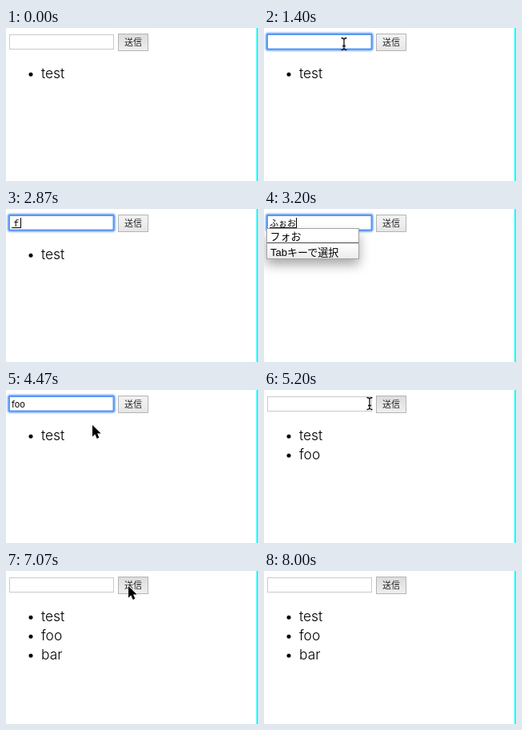
These frames come from a looping animation (315x192 px, 8870 ms). An HTML page:

```html
<!DOCTYPE html>
<html lang="ja">
<head>
<meta charset="utf-8">
<title>Form demo</title>
<style>
  html, body { margin: 0; width: 315px; height: 192px; overflow: hidden; background: #fff; }
  svg { display: block; }
  text { white-space: pre; }
  .item { font: 300 17.4px Inter, "Noto Sans CJK JP", sans-serif; }
  .field { font: 11px Inter, "Noto Sans CJK JP", sans-serif; }
  .menu { font: 500 13px "Liberation Sans", "Noto Sans CJK JP", sans-serif; }
</style>
</head>
<body>
<svg width="315" height="192" viewBox="0 0 315 192">
  <defs>
    <linearGradient id="light" x2="0" y2="1">
      <stop offset=".38" stop-color="#f0f0f0"/><stop offset="1" stop-color="#e5e5e5"/>
    </linearGradient>
    <linearGradient id="dark" x2="0" y2="1">
      <stop offset="0" stop-color="#dcdcdc"/><stop offset="1" stop-color="#efefef"/>
    </linearGradient>
    <linearGradient id="foot" x2="0" y2="1">
      <stop offset="0" stop-color="#fff"/><stop offset="1" stop-color="#ececec"/>
    </linearGradient>
    <filter id="soft" x="-30%" y="-80%" width="160%" height="260%"><feGaussianBlur stdDeviation="7"/></filter>
    <filter id="glow" x="-10%" y="-50%" width="120%" height="200%"><feGaussianBlur stdDeviation="1"/></filter>
  </defs>
  <g id="scene"></g>
</svg>
<script>
const LOOP = 8870, FPS = 15;
const scene = document.getElementById('scene');

// Pointer strokes: [tick, x, y]; the pointer is hidden between strokes.
const strokes = [
  { end: 28, keys: [[3, 243, 103], [5, 196, 58], [7, 148, 24], [10, 100, 16], [12, 100, 16], [13, 100, 20]] },
  { end: 90, keys: [[67, 108, 44], [70, 190, 40], [73, 160, 19], [76, 156, 18], [80, 108, 16], [82, 94, 20]] },
  { end: 111, keys: [[99, 94, 20], [103, 153, 19], [108, 153, 19], [109, 195, 65], [110, 243, 120]] }
];

// Field contents: [tick, text, caret x, composing]
const typing = [
  [0, '', 7], [28, 'ｓ', 18, 1], [37, '', 7], [43, 'ｆ', 18, 1], [45, 'ふぉ', 29, 1],
  [48, 'ふぉお', 40, 1], [53, 'foo', 24, 1], [60, 'foo', 24], [75, '', 7],
  [96, 'b', 14], [97, 'ba', 20], [98, 'bar', 24], [106, '', 7]
];

// Candidate menus: [tick, opacity, ...items]
const first = ['って', 'って分かる', 'する'];
const menus = [
  [0, 0], [30, .5, ...first], [31, 1, ...first], [37, .4, ...first], [38, 0],
  [44, 1, 'ふ', 'ふたつ', 'ふる'], [46, 1, 'フォ', 'ふぉ'],
  [48, 1, 'フォお'], [53, .5, 'フォお'], [54, .15, 'フォお'], [56, 0]
];

const focusSpans = [[13, 74], [85, 103]];
const caretSpans = [[14, 21], [28, 64], [86, 92], [96, 103]];
const within = (spans, n) => spans.some(([a, b]) => n >= a && n < b);
const latest = (list, n) => list.filter(k => k[0] <= n).pop();

function box(x, y, w, h, attrs) {
  return `<rect x="${x}" y="${y}" width="${w}" height="${h}" ${attrs}/>`;
}

function label(cls, x, y, s) {
  return `<text class="${cls}" x="${x}" y="${y}">${s}</text>`;
}

function field(n, focused) {
  const [, text, caret, composing] = latest(typing, n);
  let out = focused
    ? box(3.5, 7.5, 131.5, 19.5, 'rx="1.5" fill="none" stroke="#5f9bf5" stroke-width="3" filter="url(#glow)"') +
      box(4, 8, 130.5, 18.5, 'rx=".5" fill="#fff" stroke="#5a97f2" stroke-width="2"')
    : box(4.5, 8.5, 130, 18, 'fill="#fff" stroke="#c9c9c9"');
  out += label('field', 7, 22, text);
  if (composing) out += box(7, 23, caret - 7, 1, '');
  if (within(caretSpans, n)) out += box(caret, 11, 1, 13, '');
  return out;
}

function button(n, focused) {
  const pressed = within([[73, 75], [104, 106]], n);
  const fill = pressed ? '#d6d6d6' : `url(#${focused ? 'light' : 'dark'})`;
  return box(140.5, 7.5, 37, 21, `fill="${fill}" stroke="#b4b4b4"`) +
    `<g fill="#222">${label('field', 148, 21.5, '送信')}</g>`;
}

function list(n) {
  const items = ['test'];
  if (n >= 75) items.push('foo');
  if (n >= 106) items.push('bar');
  return items.map((s, i) =>
    `<circle cx="31" cy="${58.3 + 24 * i}" r="2.5"/>` + label('item', 44, 63 + 24 * i, s)).join('');
}

function menu(n) {
  const [, opacity, ...items] = latest(menus, n);
  if (!opacity) return '';
  const line = 24 + 18 * items.length, h = line - 4;
  return `<g opacity="${opacity}">` +
    box(3, 32, 116, h, 'fill-opacity=".34" filter="url(#soft)"') +
    box(3.5, 24.5, 115, h, 'fill="#fff" stroke="#a2a2a2"') +
    box(4, line + 1, 114, 19, 'fill="url(#foot)"') +
    box(4, line, 114, 1, 'fill="#444"') +
    items.map((s, i) => label('menu', 7.5, 39 + 18 * i, s)).join('') +
    label('menu', 8, line + 17, 'Tabキーで選択') + '</g>';
}

function pointer(n) {
  const stroke = strokes.find(s => n >= s.keys[0][0] && n < s.end);
  if (!stroke) return '';
  const from = latest(stroke.keys, n);
  const to = stroke.keys.find(k => k[0] > n) || from;
  const p = to === from ? 0 : (n - from[0]) / (to[0] - from[0]);
  const x = from[1] + (to[1] - from[1]) * p, y = from[2] + (to[2] - from[2]) * p;
  const inField = x > 4 && x < 135 && y > 7 && y < 28;
  const shape = inField
    ? '<path d="M-3.5-7.5Q0-7.5 0-5Q0-7.5 3.5-7.5M0-5V5M-3.5 7.5Q0 7.5 0 5Q0 7.5 3.5 7.5M-2 2.5H2" fill="none" stroke="#111" stroke-width="1.3"/>'
    : '<path d="M0 0V14.5L3.3 11.5L5.7 17L8.4 15.8L6 10.5H10.6Z" stroke="#fff" stroke-width="1.2" paint-order="stroke"/>';
  return `<g transform="translate(${x} ${y})">${shape}</g>`;
}

let shown = -1;
function draw(now) {
  const n = Math.floor((now % LOOP) * FPS / 1000 + .06);
  if (n !== shown) {
    shown = n;
    const focused = within(focusSpans, n);
    scene.innerHTML = box(313, 0, 2, 192, 'fill="#0ff"') +
      list(n) + button(n, focused) + field(n, focused) + menu(n) + pointer(n);
  }
}

const start = performance.now();
function tick() {
  draw(performance.now() - start);
  requestAnimationFrame(tick);
}
tick();
</script>
</body>
</html>
```
